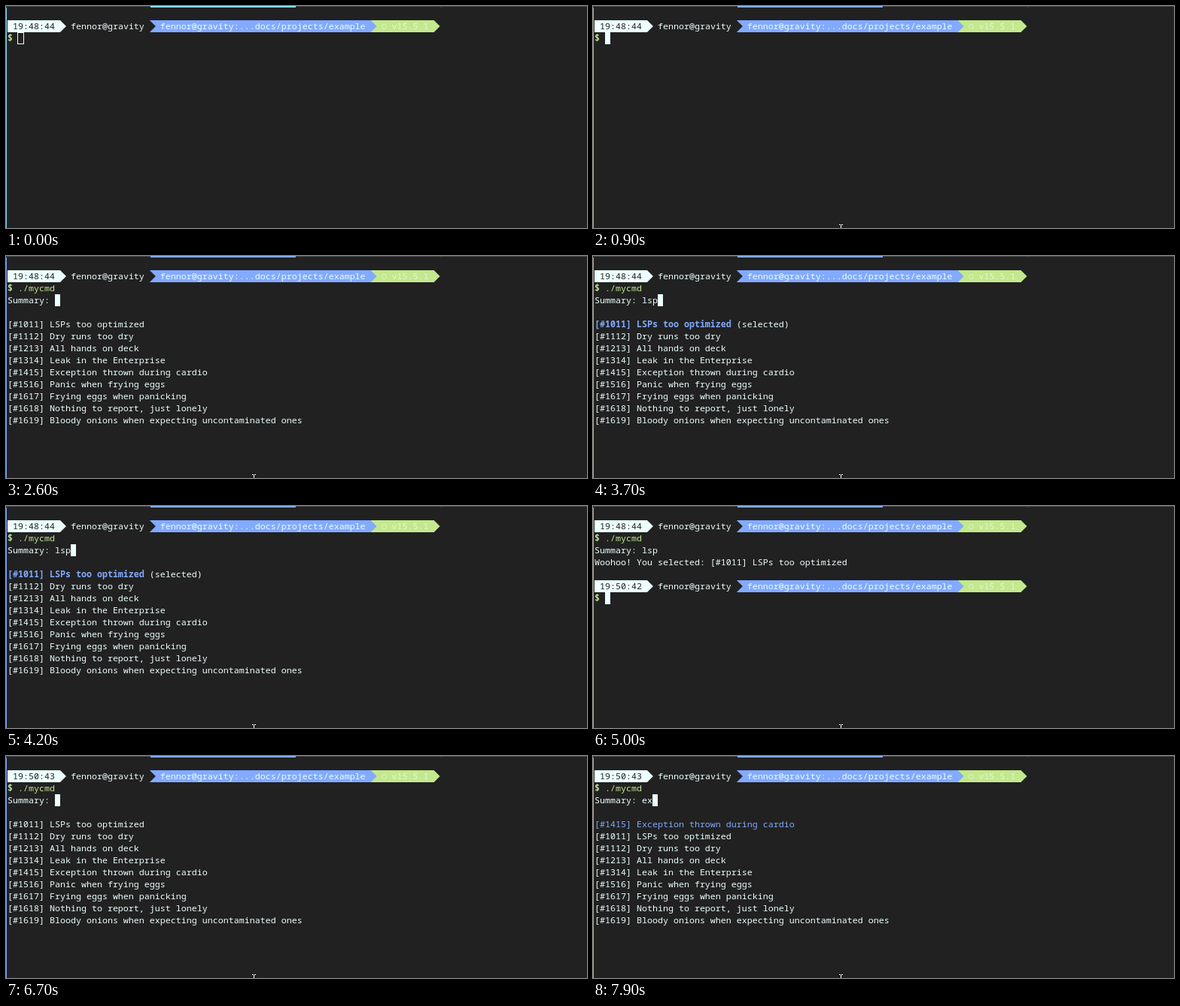
An HTML page that plays this animation: 772x296 px, repeating every 8000 ms.

```html
<!DOCTYPE html>
<html lang="en">
<head>
<meta charset="utf-8">
<title>Terminal session</title>
<style>
  :root { --bg: #212121; --fg: #eeffff; --blue: #82aaff; --green: #c3e88d; --accent: var(--blue); }
  html, body { margin: 0; width: 100%; height: 100%; overflow: hidden; background: var(--bg); }
  #stage { position: relative; width: 772px; height: 296px; overflow: hidden; background: var(--bg); }
  #stage.idle { --accent: #89ddff; }
  #stage > div { position: absolute; }
  #tabs { left: 0; top: 0; width: 772px; height: 1px; background: #4b4b4b; }
  #tabs::after { content: ""; position: absolute; left: 578px; width: 1px; height: 2px; background: #4b4b4b; }
  #active { left: 192px; top: 0; width: 193px; height: 2px; background: var(--accent); }
  #edge { left: 0; top: 2px; width: 1px; height: 294px; background: var(--accent); }
  #screen {
    left: 2px; top: 19px; color: var(--fg); white-space: pre;
    font: 11.667px/16px "Noto Sans Mono", "DejaVu Sans Mono", monospace;
  }
  .row { height: 16px; }
  .seg, .arrow, .cursor { display: inline-block; height: 16px; vertical-align: top; }
  .clock { background: var(--fg); color: var(--bg); }
  .path { background: var(--blue); }
  .version { background: var(--green); color: #e4f7d2; }
  .arrow { position: relative; width: 7px; }
  .arrow::before {
    content: ""; position: absolute; left: 0; top: 0; width: 8px; height: 16px;
    background: currentColor; clip-path: polygon(0 0, 100% 50%, 0 100%);
  }
  .dot { display: inline-block; box-sizing: border-box; width: 7px; height: 7px; border: 1px solid; border-radius: 50%; opacity: .75; }
  .cursor { width: 7px; background: var(--fg); }
  .idle .cursor { box-sizing: border-box; width: 9px; margin-left: -1px; background: none; border: 1px solid var(--fg); }
  .green { color: var(--green); }
  .blue { color: var(--blue); }
  .bold { font-weight: 700; }
  .typing { text-decoration: underline; }
  #pointer { left: 326px; top: 291px; }
  .idle #pointer { display: none; }
  #pointer svg { display: block; }
</style>
</head>
<body>
<div id="stage">
  <div id="tabs"></div>
  <div id="active"></div>
  <div id="edge"></div>
  <div id="screen"></div>
  <div id="pointer"><svg width="7" height="5"><path d="M1 .5H3M4 .5H6M3.5 1V5" stroke="#fff" fill="none"/></svg></div>
</div>
<script>
const LOOP = 8000;
const HOST = "fennor@gravity";
const ISSUES = [
  "[#1011] LSPs too optimized",
  "[#1112] Dry runs too dry",
  "[#1213] All hands on deck",
  "[#1314] Leak in the Enterprise",
  "[#1415] Exception thrown during cardio",
  "[#1516] Panic when frying eggs",
  "[#1617] Frying eggs when panicking",
  "[#1618] Nothing to report, just lonely",
  "[#1619] Bloody onions when expecting uncontaminated ones"
];
const CURSOR = '<span class="cursor"></span>';
const FIRST = "19:48:44", SECOND = "19:50:42", THIRD = "19:50:43";

const span = (cls, text) => `<span class="${cls}">${text}</span>`;
const arrow = (from, to) =>
  `<span class="arrow" style="color:var(--${from});background:var(--${to})"></span>`;

const prompt = clock =>
  span("seg clock", ` ${clock} `) + arrow("fg", "bg") + ` ${HOST} ` +
  arrow("bg", "blue") + span("seg path", ` ${HOST}:...docs/projects/example `) +
  arrow("blue", "green") + span("seg version", ` ${span("dot", "")} v15.5.1 `) +
  arrow("green", "bg");

const command = (text, done = text === "./mycmd") =>
  span("green bold", "$") + " " + span(done ? "green" : "typing", text);

const shell = (clock, typed) => [prompt(clock), command(typed) + CURSOR];
const launched = clock => [prompt(clock), command("./mycmd"), CURSOR];

// The best match moves to the top of the list.
function picker(clock, query, match = -1, selected = false) {
  const rest = ISSUES.filter((_, i) => i !== match);
  const best = match < 0 ? [] :
    [span(selected ? "blue bold" : "blue", ISSUES[match]) + (selected ? " (selected)" : "")];
  return [prompt(clock), command("./mycmd"), `Summary: ${query}${CURSOR}`, "", ...best, ...rest];
}

const result = () => [
  prompt(FIRST), command("./mycmd"), "Summary: lsp",
  `Woohoo! You selected: ${ISSUES[0]}`, "", ...shell(SECOND, "")
];

const STEPS = [
  [0, shell(FIRST, "")],
  [1200, shell(FIRST, ".")],
  [1400, shell(FIRST, "./")],
  [1500, shell(FIRST, "./m")],
  [1600, shell(FIRST, "./my")],
  [1700, shell(FIRST, "./myc")],
  [1800, shell(FIRST, "./mycm")],
  [1900, shell(FIRST, "./mycmd")],
  [2200, launched(FIRST)],
  [2400, picker(FIRST, "")],
  [3100, picker(FIRST, "l", 0)],
  [3200, picker(FIRST, "ls", 0)],
  [3400, picker(FIRST, "lsp", 0)],
  [3600, picker(FIRST, "lsp", 0, true)],
  [4400, result()],
  [5300, shell(THIRD, "")],
  [5500, shell(THIRD, "./mycmd")],
  [5700, launched(THIRD)],
  [5900, picker(THIRD, "")],
  [7800, picker(THIRD, "e", 4)],
  [7900, picker(THIRD, "ex", 4)]
];
const FOCUS_AT = 200;

const stage = document.getElementById("stage");
const screenBox = document.getElementById("screen");
const start = performance.now();
let shown = null;

function draw() {
  const time = (performance.now() - start) % LOOP;
  const rows = STEPS.filter(([at]) => at <= time).pop()[1];
  stage.classList.toggle("idle", time < FOCUS_AT);
  if (rows !== shown) {
    shown = rows;
    screenBox.innerHTML = rows.map(row => `<div class="row">${row}</div>`).join("");
  }
  requestAnimationFrame(draw);
}
draw();
</script>
</body>
</html>
```
